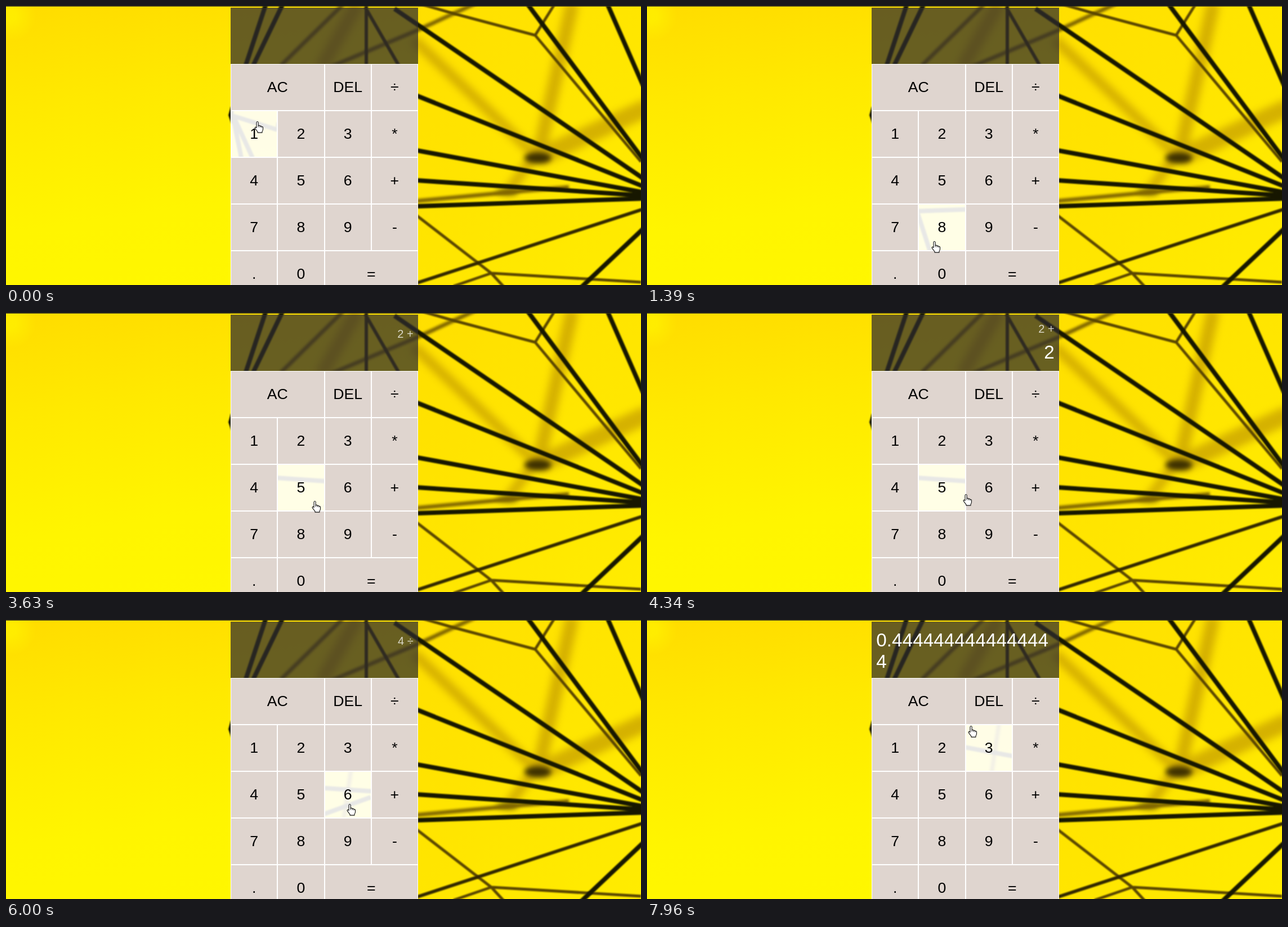
Animation, 1128 px wide and 496 px high, one loop 8 s. Source, as an HTML page:

```html
<!DOCTYPE html>
<html lang="en">
<head>
<meta charset="utf-8">
<title>Calculator</title>
<style>
html, body { margin: 0; width: 100%; height: 100%; overflow: hidden; }
body {
  position: relative;
  background:
    radial-gradient(circle at 8px 18px, rgba(255,240,0,.8) 10px, transparent 45px),
    linear-gradient(172deg, #ffdc00 0, #ffe900 28%, #fff500 62%, #fff800 100%);
  font-family: "Liberation Sans", Arial, sans-serif;
}
svg { position: absolute; left: 0; top: 0; }
#scene { width: 1128px; height: 496px; fill: none; stroke-linejoin: round; }
.haze { filter: blur(7px); stroke: #c79f00; stroke-opacity: .75; }
.far { filter: blur(2.2px); stroke: #806600; stroke-width: 7px; }
.mid { filter: blur(1.2px); stroke: #5b4700; stroke-width: 5px; }
.near { filter: blur(.9px); stroke: #171700; stroke-width: 8px; }
.knot { filter: blur(5px); fill: #3d3000; }
.edge { position: absolute; left: 0; top: 0; width: 100%; height: 1px; background: #39361c; }
#calc {
  position: absolute; left: 399px; top: 3px; width: 333px;
  display: grid; grid-template: 100px repeat(5, 83px) / repeat(4, 1fr);
}
.output {
  grid-column: 1 / -1; box-sizing: border-box; padding: 8.33px;
  display: flex; flex-direction: column; align-items: flex-end; justify-content: space-around;
  background: rgba(46,43,46,.72); word-break: break-all;
}
#upper { font-size: 20px; color: rgba(255,255,255,.75); }
#lower { font-size: 33.33px; color: #fff; }
.key {
  box-sizing: border-box; border: 1px solid #fff; background: #dfd5cf;
  display: flex; align-items: center; justify-content: center;
  font-size: 26.67px; color: #000;
}
.wide { grid-column: span 2; }
.key.hover { background: rgba(255,255,255,.9); }
#hand { width: 20px; height: 24px; }
</style>
</head>
<body>
<svg id="scene" viewBox="0 0 1128 496">
  <linearGradient id="warm" x2="1" y2="1">
    <stop stop-color="#ffdf00"/>
    <stop offset="1" stop-color="#ffec00"/>
  </linearGradient>
  <rect x="731" width="397" height="496" fill="url(#warm)"/>
  <g class="haze">
    <path stroke-width="24" d="M1006-5L945 270M625-5L560 110"/>
    <path stroke-width="18" d="M725 60L940 265L890 332"/>
    <path stroke-width="32" d="M945 270L1140 180"/>
  </g>
  <g class="knot">
    <ellipse cx="945" cy="270" rx="24" ry="10"/>
    <ellipse cx="890" cy="331" rx="20" ry="5" opacity=".7"/>
  </g>
  <path class="far" d="M725 347L895 331L1000 322M560 115L731 43L835-5M626 180L600 352M600-4L488 106"/>
  <path class="mid" d="M735-4L790 12L940 52L975-4M940 52L1128 277"/>
  <path class="mid" d="M725 369L862 475L885 500M795 498L862 475L1128 491"/>
  <path class="mid" style="stroke:#332900;stroke-width:6px" d="M1132 361L725 494M640-4V104M638 2L699 108"/>
  <g class="near" id="fan">
    <path d="M926-4L1132 273M1068-4L1132 142M1132 396L1022 500"/>
    <path d="M462-4L425 108M492-4L438 108M565 345L648 315"/>
    <path d="M403 180L399 194L404 208M399 194L482 220M404 200L418 270M406 200L438 270M478 360L504 440"/>
  </g>
</svg>
<div class="edge"></div>
<div id="calc">
  <div class="output"><div id="upper"></div><div id="lower"></div></div>
</div>
<svg id="hand" viewBox="-10 -12 20 24">
  <path fill="#fff" stroke="#111" stroke-width="1.1" stroke-linejoin="round"
    d="M-4-7.5q0-2 1.6-2t1.6 2v5q3-.6 3 1 2.6-.6 2.8 1 2.5-.4 2.5 1.6v3q0 2.5-1.5 4v2h-8v-1.5l-4.5-6q-1-1.6.4-2.2 1-.3 2.1 1.2z"/>
  <path fill="none" stroke="#111" d="M-.8-2.5v3M2.2-1.5v2.4M5-.5v2"/>
</svg>
<script>
const LOOP = 8000, TICK = 77, LEFT = 399, TOP = 103, CELL = 83;
const $ = id => document.getElementById(id);

// near wires run together towards a hub at the right edge
for (const y of [33, 160, 257, 310, 356]) {
  const end = 303 + y * 0.11, slope = (end - y) / 401;
  const start = y < 200 ? 690 : 480;
  const ray = document.createElementNS('http://www.w3.org/2000/svg', 'path');
  ray.setAttribute('d', `M${start} ${y - slope * (731 - start)}L1132 ${end}`);
  $('fan').append(ray);
}

const keys = [];
let slot = 0;
for (const label of 'AC DEL ÷ 1 2 3 * 4 5 6 + 7 8 9 - . 0 ='.split(' ')) {
  const span = label === 'AC' || label === '=' ? 2 : 1;
  const el = document.createElement('div');
  el.className = span > 1 ? 'key wide' : 'key';
  el.textContent = label;
  $('calc').append(el);
  keys.push({ el, span, col: slot % 4, row: Math.floor(slot / 4) });
  slot += span;
}

const presses = [
  [2410, '2'], [3240, '+'], [4020, '2'], [4830, '='],
  [5690, '÷'], [6380, '9'], [7320, '=']
];

// pointer trips: start, end, x, y
const trips = [
  [530, 690, 480, 160],
  [690, 1070, 515, 415],
  [1230, 1390, 513, 428],
  [1390, 2010, 513, 244],
  [2410, 2640, 700, 325],
  [2640, 3090, 688, 355],
  [3240, 3470, 568, 396],
  [3470, 3860, 518, 246],
  [4020, 4750, 650, 470],
  [4830, 5060, 628, 145],
  [5060, 5620, 690, 148],
  [5690, 6150, 586, 402],
  [6380, 6870, 650, 470],
  [7320, 7960, 578, 198]
];

function display(t) {
  let first = '', op = '', entry = '';
  for (const [at, key] of presses) {
    if (at > t) break;
    if (key === '=') {
      entry = String(op === '+' ? +first + +entry : first / entry);
      first = op = '';
    } else if (key === '+' || key === '÷') {
      [first, op, entry] = [entry, key, ''];
    } else entry += key;
  }
  return [op && `${first} ${op}`, entry];
}

function pointer(t) {
  let x = 449, y = 215;
  for (const [start, end, toX, toY] of trips) {
    if (start > t) break;
    const steps = Math.floor((t - start) / TICK + 0.15);
    const u = t >= end ? 1 : Math.min(1, steps * TICK / (end - start));
    const ease = u * u * (3 - 2 * u);
    x += (toX - x) * ease;
    y += (toY - y) * ease;
  }
  return [x, y];
}

function setText(el, text) {
  if (el.textContent !== text) el.textContent = text;
}

function draw(t) {
  const [upper, lower] = display(t);
  setText($('upper'), upper);
  setText($('lower'), lower);

  const [x, y] = pointer(t);
  $('hand').style.transform = `translate(${Math.round(x) - 10}px, ${Math.round(y) - 12}px)`;
  const col = Math.floor((x - 5 - LEFT) / CELL), row = Math.floor((y - 9 - TOP) / CELL);
  for (const k of keys)
    k.el.classList.toggle('hover', k.row === row && col >= k.col && col < k.col + k.span);
}

const origin = performance.now();
function tick() {
  draw((performance.now() - origin) % LOOP);
  requestAnimationFrame(tick);
}
tick();
</script>
</body>
</html>
```
